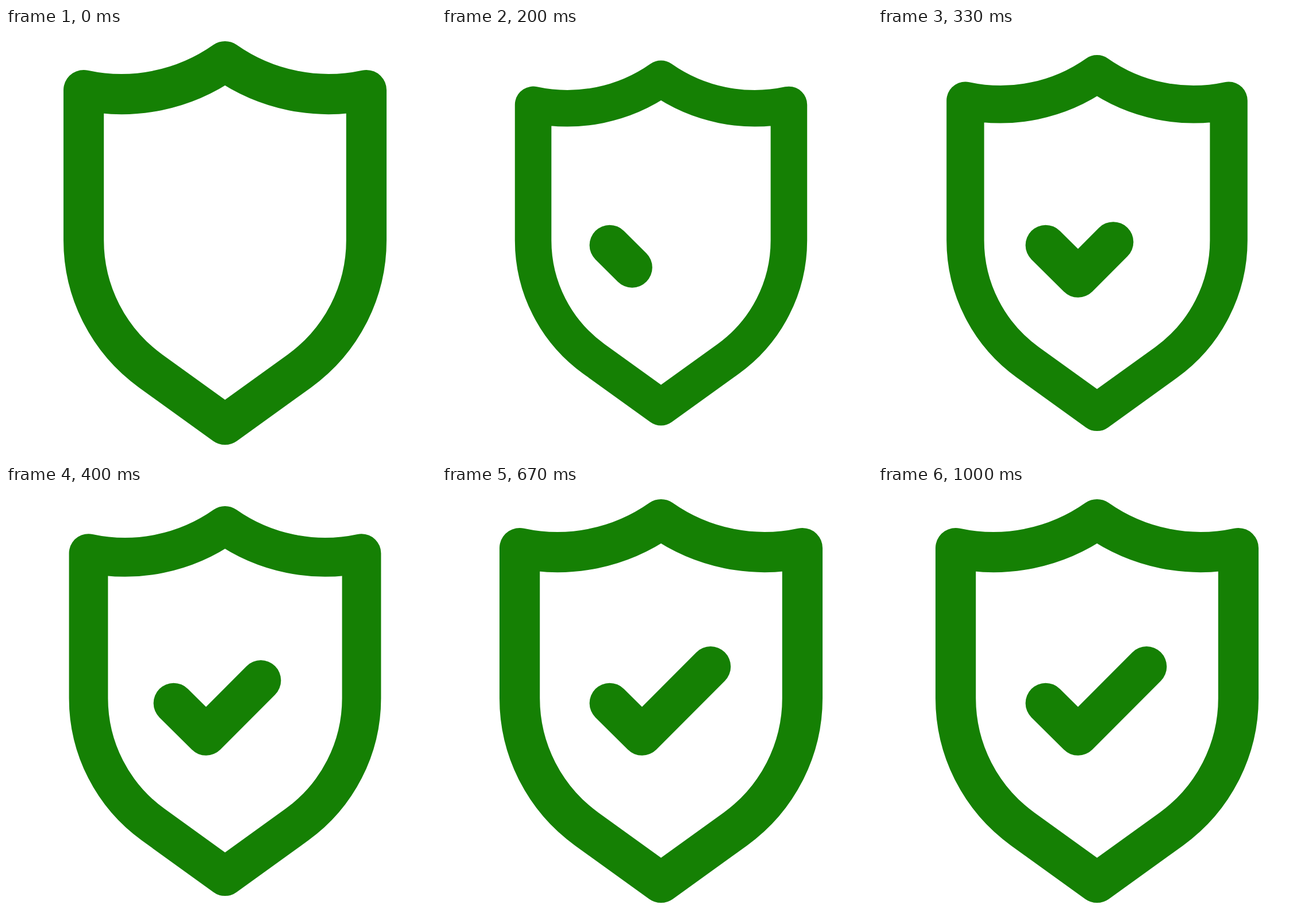
Recreate the animation shown at these times as an HTML page. Size 748 by 748 pixels, loop 1.07 s.

```html
<!DOCTYPE html>
<html lang="en">
<head>
<meta charset="utf-8">
<title>Shield check</title>
<style>
  html, body { margin: 0; height: 100%; overflow: hidden; background: #fff; }
  svg { display: block; width: 100vw; height: 100vh; }
  path { fill: none; stroke: #158004; stroke-width: 70.2; stroke-linecap: round; stroke-linejoin: round; }
</style>
</head>
<body>
<svg viewBox="0 0 748 748">
  <path id="shield" d="M381 58A312.7 312.7 0 0 1 135.1 108V369A280.8 280.8 0 0 0 251.6 596.7L381 690L510.4 596.7A280.8 280.8 0 0 0 626.9 369V108A312.7 312.7 0 0 1 381 58Z"/>
  <path id="check" pathLength="1" d="M291.7 377.8L348 433.7L467.2 314.2"/>
</svg>
<script>
const LOOP = 1070, STEP = 1000 / 15;
const shield = document.getElementById('shield');
const check = document.getElementById('check');
const clamp = x => Math.min(1, Math.max(0, x));

// Shrinks to 0.9, then grows back; both ramps are linear in steps.
function shieldScale(i) {
  const down = 0.047 * (i - 0.97), up = 0.0342 * (7 - i);
  return 1 - Math.max(0, Math.min(down, up));
}

function draw(now) {
  const i = Math.floor((now % LOOP + 4) / STEP);
  const s = shieldScale(i);
  shield.setAttribute('transform', `translate(381 374) scale(${s}) translate(-381 -374)`);

  const drawn = (1 - Math.cos(Math.PI * clamp((i - 0.906) * 0.149))) / 2;
  check.style.visibility = i > 0 ? 'visible' : 'hidden';
  check.setAttribute('stroke-dasharray', drawn < 1 ? `${drawn} 2` : 'none');
}

const start = performance.now();
function tick() {
  draw(performance.now() - start);
  requestAnimationFrame(tick);
}
draw(0);
tick();
</script>
</body>
</html>
```
